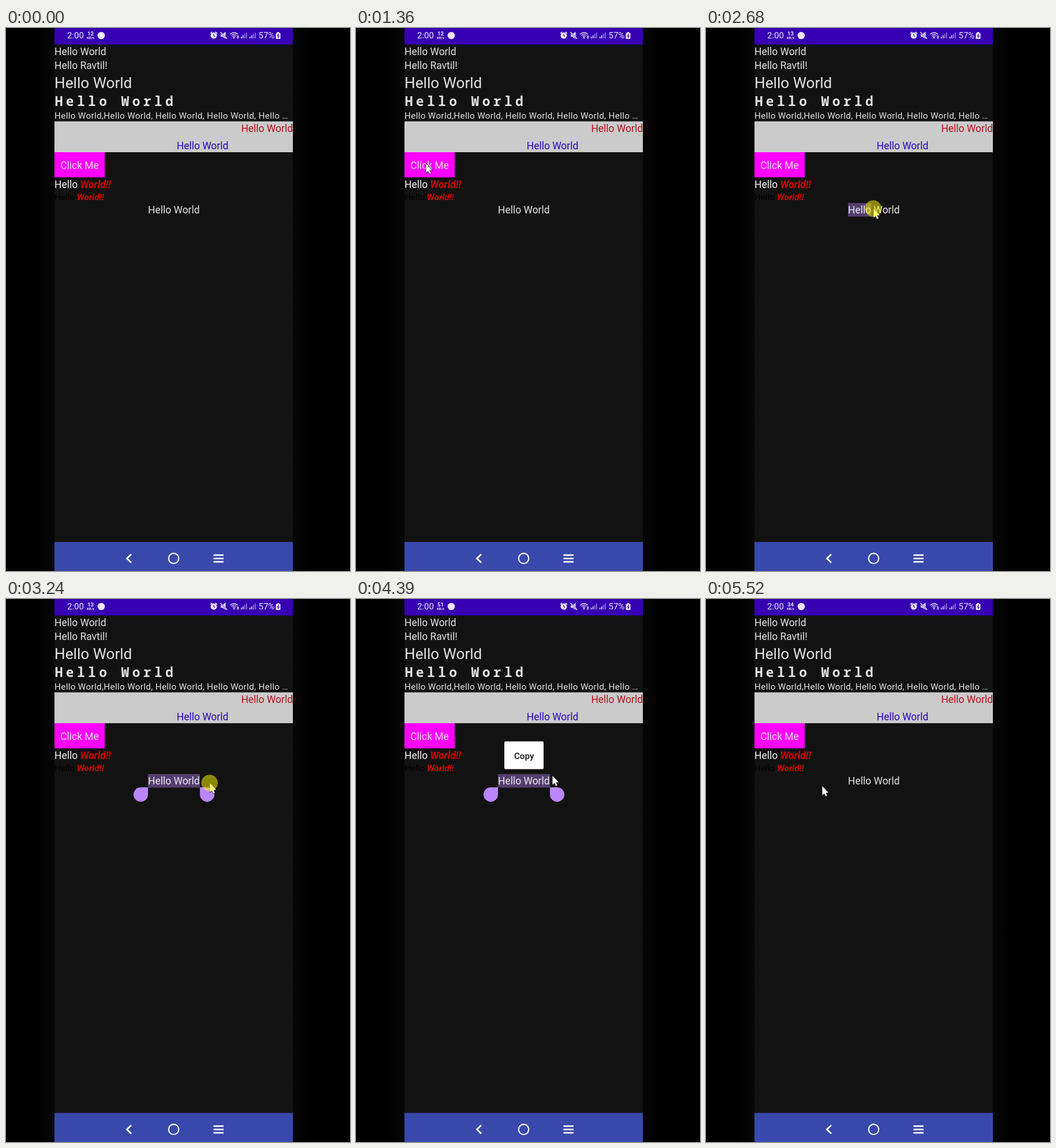
These frames come from a looping animation (596 by 940 pixels, 5.59 s). An HTML page with a canvas:

```html
<!DOCTYPE html>
<html lang="en">
<head>
<meta charset="utf-8">
<title>Text demo</title>
<style>
html, body { margin: 0; width: 100%; height: 100%; overflow: hidden; background: #000; }
canvas { display: block; }
</style>
</head>
<body>
<canvas id="stage" width="596" height="940"></canvas>
<script>
const ctx = document.getElementById('stage').getContext('2d');
const LOOP = 5590;
const LEFT = 84, RIGHT = 497, WIDTH = RIGHT - LEFT, MID = (LEFT + RIGHT) / 2;
const BODY = 17.45, SMALL = BODY * 14 / 16, LARGE = BODY * 1.5;
const LIGHT = '#e4e4e4', ICON = '#ebe6f7', BAR = '#3700b3', RED = '#d40000';

// Moments in the story, in ms
const ENTER = 390, CLICK = 1420, HOLD = 2260, SELECT = 2650, EXTEND = 3010;
const GRAB = 3170, RELEASE = 3640, DISMISS = 5050;

const ENTRY = { x: 8, y: 406 };
const moves = [
  { from: ENTER, to: 870, x: 121, y: 235 },
  { from: 1690, to: 1910, x: 287, y: 342 },
  { from: 1960, to: HOLD, x: 290, y: 313 },
  { from: 2890, to: GRAB, x: 353, y: 319 },
  { from: RELEASE, to: 4100, x: 340, y: 306 },
  { from: 4400, to: 4690, x: 418, y: 304 },
  { from: 5100, to: 5310, x: 366, y: 314 },
  { from: 5340, to: 5520, x: 201, y: 324 }
];
const speeds = ['12', '13', '51', '34'];

const within = (t, a, b) => t >= a && t < b;
const ramp = (t, a, b) => Math.min(1, Math.max(0, (t - a) / (b - a)));
const ease = k => k * k * (3 - 2 * k);
const fade = (t, a, b, time) => ramp(t, a, a + time) * (1 - ramp(t, b, b + time));

function pointerAt(t) {
  return moves.reduce((p, m) => {
    const k = ease(ramp(t, m.from, m.to));
    return { x: p.x + (m.x - p.x) * k, y: p.y + (m.y - p.y) * k };
  }, ENTRY);
}

function rect(x, y, w, h, color) {
  ctx.fillStyle = color;
  ctx.fillRect(x, y, w, h);
}

function disc(x, y, r, color) {
  ctx.fillStyle = color;
  ctx.beginPath();
  ctx.arc(x, y, r, 0, Math.PI * 2);
  ctx.fill();
}

function ring(x, y, r, color, width, from = 0, to = Math.PI * 2) {
  ctx.strokeStyle = color;
  ctx.lineWidth = width;
  ctx.beginPath();
  ctx.arc(x, y, r, from, to);
  ctx.stroke();
}

function pill(x, y, w, h, r, color) {
  ctx.fillStyle = color;
  ctx.beginPath();
  ctx.roundRect(x, y, w, h, r);
  ctx.fill();
}

function shape(d, color) {
  ctx.fillStyle = color;
  ctx.fill(new Path2D(d));
}

function line(d, color, width) {
  ctx.strokeStyle = color;
  ctx.lineWidth = width;
  ctx.stroke(new Path2D(d));
}

function text(str, x, y, { size = BODY, color = LIGHT, style = '', align = 'left',
                           spacing = 0, family = 'Roboto, sans-serif' } = {}) {
  ctx.font = `${style} ${size}px ${family}`;
  ctx.letterSpacing = spacing + 'px';
  ctx.textAlign = align;
  ctx.fillStyle = color;
  ctx.fillText(str, x, y);
}

function withAlpha(alpha, paint) {
  if (!alpha) return;
  ctx.globalAlpha = alpha;
  paint();
  ctx.globalAlpha = 1;
}

function backdrop() {
  rect(0, 0, 596, 940, '#000');
  const glow = ctx.createLinearGradient(LEFT - 32, 0, RIGHT + 32, 0);
  const inset = 32 / (WIDTH + 64);
  [0, inset, 1 - inset, 1].forEach((stop, i) => glow.addColorStop(stop, i % 3 ? '#060606' : '#000'));
  rect(LEFT - 32, 0, WIDTH + 64, 940, glow);
  rect(LEFT, 0, WIDTH, 940, '#121212');
}

function alarm(x, y) {
  disc(x, y, 5.4, ICON);
  line(`M${x} ${y - 3}v3.2l2.2 1.3`, BAR, 1.2);
  line(`M${x - 5.8} ${y - 3.7}l3.2-2.6M${x + 5.8} ${y - 3.7}l-3.2-2.6`, ICON, 1.7);
}

function mutedSpeaker(x, y) {
  shape(`M${x - 5} ${y - 2.5}h3l5.5-4v12.5l-5.5-4h-3z`, ICON);
  line(`M${x - 6} ${y - 6.4}l12 12`, BAR, 2.6);
  line(`M${x - 5.5} ${y - 6}l11.5 11.6`, ICON, 1.5);
}

function wifi(x, y) {
  for (let r = 3; r < 10; r += 2.9) ring(x, y, r, ICON, 1.3, -Math.PI * 0.77, -Math.PI * 0.23);
  disc(x, y, 1.4, ICON);
  shape(`M${x + 4.5} ${y - 1.6}h4.6l-2.3-2.6zm0 1h4.6l-2.3 2.6z`, ICON);
}

function signal(x) {
  for (let i = 0; i < 4; i++) {
    const h = 3 + i * 2.4;
    rect(x + i * 3, 18 - h, 1.5, h, i < 2 ? ICON : '#9d86d8');
  }
}

function battery(x, y) {
  pill(x - 4, y - 5, 8, 10.5, 1.5, ICON);
  rect(x - 1.8, y - 6.5, 3.6, 2, ICON);
  line(`M${x + 1} ${y - 3.2}l-2 3.6h2.2l-1.4 3.4`, BAR, 1.3);
}

function statusBar(t) {
  rect(LEFT, 0, WIDTH, 28.5, BAR);
  text('2:00', 106, 18.4, { size: 15, color: ICON });
  const tiny = { style: 'bold', align: 'center', color: ICON };
  text(speeds[Math.max(0, Math.floor((t - 1200) / 1250))], 146.5, 13, { ...tiny, size: 9.5 });
  text('KB/s', 146.5, 19, { ...tiny, size: 6 });
  disc(165, 13, 6.3, ICON);
  alarm(360, 13.2);
  mutedSpeaker(377, 13);
  wifi(395, 16.8);
  signal(407);
  signal(422);
  text('57%', 437.5, 18.4, { size: 15, color: ICON });
  battery(471.5, 13.5);
}

function navBar() {
  rect(LEFT, 889.7, WIDTH, 51, '#3949ab');
  line('M217 911l-7.5 7.2 7.5 7.3', '#fff', 2.7);
  ring(MID, 918.2, 8.8, '#fff', 2.1);
  for (let i = -1; i < 2; i++) rect(359.5, 917 + i * 5.8, 17.5, 2.6, '#fff');
}

function greeting(y, size, color) {
  text('Hello ', LEFT, y, { size, color });
  const x = LEFT + ctx.measureText('Hello ').width;
  text('World!!', x, y, { size, color: RED, style: 'italic bold' });
}

function content() {
  const hello = 'Hello World';
  text(hello, LEFT, 47.4);
  text('Hello Ravtil!', LEFT, 71.2);
  text(hello, LEFT, 104, { size: LARGE });
  text(hello, 84.7, 135, {
    size: 22.9, spacing: 5.4, style: '600', family: '"Noto Sans Mono", monospace'
  });
  const repeated = `${hello},` + `${hello}, `.repeat(3) + 'Hello …';
  text(repeated, LEFT, 157.4, { size: SMALL, spacing: 0.33 });

  rect(LEFT, 161.6, WIDTH, 53.4, '#cbcbcb');
  text(hello, RIGHT, 180.3, { color: '#b5121b', align: 'right' });
  text(hello, 340.5, 209.8, { color: '#2a08bd', align: 'center' });

  rect(LEFT, 215, 87, 43.5, '#ff00ff');
  text('Click Me', 127.5, 243.6, { align: 'center' });

  greeting(277, BODY, '#f4f4f4');
  greeting(298.2, SMALL, '#000');
}

function selection(t) {
  const on = within(t, SELECT, DISMISS);
  if (on) rect(246, 303, t < EXTEND ? 40 : 90, 23.5, '#533f6d');
  text('Hello World', MID + 0.3, 321.2, { align: 'center', color: on ? '#eee8f5' : LIGHT });
  if (on && t >= GRAB) {
    pill(221, 326, 25, 25, [12.5, 0, 12.5, 12.5], '#bb86fc');
    pill(336, 326, 25, 25, [0, 12.5, 12.5, 12.5], '#bb86fc');
  }
}

function popup(t) {
  withAlpha(fade(t, RELEASE + 20, DISMISS, 120), () => {
    pill(257, 246.5, 68, 48, 2, '#fff');
    text('Copy', 291.2, 277, { size: SMALL, style: '500', color: '#111', align: 'center' });
  });
}

function toast(t) {
  withAlpha(fade(t, CLICK + 140, 2400, 160), () => {
    pill(235, 784, 111, 41.5, 20.75, '#5d5d5d');
    text('Clicked...', MID, 811.6, { align: 'center', color: '#f0f0f0' });
  });
}

function pointer(t) {
  if (t < ENTER) return;
  const { x, y } = pointerAt(t);
  const arrow = 'M.5 0v15.6l3.4-3.2 2.4 5.2 2.5-1.2-2.3-5 4.5-.2z';
  const pressed = within(t, CLICK, CLICK + 120) || within(t, HOLD, RELEASE) || within(t, DISMISS - 90, DISMISS);
  ctx.save();
  ctx.translate(x, y);
  line(arrow, '#1a1a1a', 1.4);
  shape(arrow, '#fff');
  if (pressed) disc(-0.3, -0.5, 14.3, 'rgba(255, 245, 0, 0.52)');
  ctx.restore();
}

function draw(t) {
  backdrop();
  statusBar(t);
  content();
  selection(t);
  popup(t);
  toast(t);
  navBar();
  pointer(t);
}

const start = performance.now();
function tick() {
  draw((performance.now() - start) % LOOP);
  requestAnimationFrame(tick);
}
tick();
</script>
</body>
</html>
```
